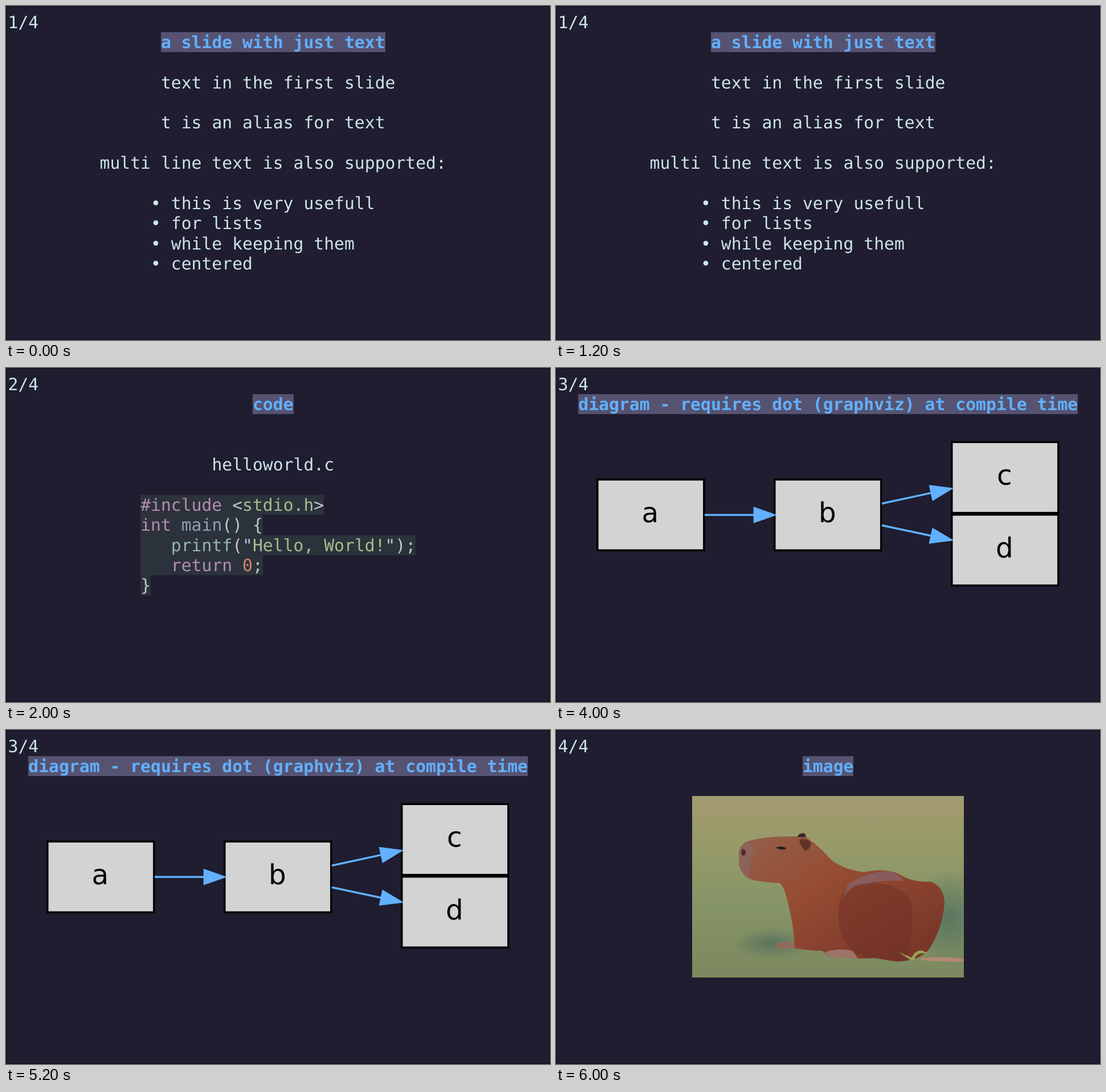
These frames come from a looping animation (955 px wide and 587 px high, 8 s). An HTML page:

```html
<!DOCTYPE html>
<html lang="en">
<head>
<meta charset="utf-8">
<title>Terminal slides</title>
<style>
  html, body { margin: 0; width: 100%; height: 100%; overflow: hidden; background: #1f1d2f; }
  svg { display: block; width: 955px; height: 587px; }
  text { white-space: pre; text-rendering: geometricPrecision; }
  .cell { font: 29.72px "DejaVu Sans Mono", monospace; }
  .bold { font-weight: bold; }
  .node { font: 48.4px "DejaVu Sans", sans-serif; text-anchor: middle; }
</style>
</head>
<body>
<svg id="stage" viewBox="0 0 955 587" xmlns="http://www.w3.org/2000/svg">
  <defs>
    <linearGradient id="grass" x1="0" y1="0" x2="0" y2="1">
      <stop offset="0" stop-color="#a39a70"/>
      <stop offset=".25" stop-color="#989b69"/>
      <stop offset=".6" stop-color="#859466"/>
      <stop offset="1" stop-color="#7c8960"/>
    </linearGradient>
    <linearGradient id="fur" x1="0" y1="0" x2="1" y2="1">
      <stop offset="0" stop-color="#94604a"/>
      <stop offset=".4" stop-color="#964c33"/>
      <stop offset="1" stop-color="#733226"/>
    </linearGradient>
    <radialGradient id="shade">
      <stop offset="0" stop-color="#4c6c5c" stop-opacity=".75"/>
      <stop offset="1" stop-color="#4c6c5c" stop-opacity="0"/>
    </radialGradient>
    <clipPath id="photo"><rect x="239" y="116.5" width="477" height="318.5"/></clipPath>
  </defs>
</svg>
<script>
const NS = "http://www.w3.org/2000/svg";
const stage = document.getElementById("stage");
const LOOP = 8000, COUNT = 4;
const INK = "#cde4ec", BLUE = "#62b0ff", BAND = "#565372", CODE_BG = "#2c323b";
const PURPLE = "#b48ead", GREY = "#c0c5ce", GREEN = "#a3be8c",
      STEEL = "#8fa1b3", TEAL = "#96b5b4", ORANGE = "#d08770";

const colX = c => 3.5 + 17.895 * c;
const rowY = r => 10.7 + 35.35 * r;

function add(parent, tag, attrs, text) {
  const el = document.createElementNS(NS, tag);
  for (const k in attrs) el.setAttribute(k, attrs[k]);
  if (text) el.textContent = text;
  parent.append(el);
  return el;
}

function write(g, row, col, str, fill = INK, cls = "cell") {
  add(g, "text", { x: colX(col), y: rowY(row) + 28, fill, class: cls }, str);
}

function band(g, row, col, len, fill) {
  const x = Math.round(colX(col)), y = Math.round(rowY(row));
  add(g, "rect", {
    x, y, fill,
    width: Math.round(colX(col + len)) - x,
    height: Math.round(rowY(row + 1)) - y
  });
}

function slide(index, col, title) {
  const g = add(stage, "g", { opacity: 0 });
  write(g, 0, 0, `${index + 1}/${COUNT}`);
  band(g, 1, col, title.length, BAND);
  write(g, 1, col, title, BLUE, "cell bold");
  g.animate([
    { opacity: 1, offset: 0, easing: "steps(1, end)" },
    { opacity: 0, offset: 1 / COUNT },
    { opacity: 0, offset: 1 }
  ], {
    duration: LOOP,
    iterations: Infinity,
    iterationStart: (COUNT - index) % COUNT / COUNT
  });
  return g;
}

function textSlide() {
  const g = slide(0, 15, "a slide with just text");
  [
    [3, 15, "text in the first slide"],
    [5, 15, "t is an alias for text"],
    [7, 9, "multi line text is also supported:"],
    [9, 14, "• this is very usefull"],
    [10, 14, "• for lists"],
    [11, 14, "• while keeping them"],
    [12, 14, "• centered"]
  ].forEach(line => write(g, ...line));
}

function codeSlide() {
  const g = slide(1, 24, "code");
  write(g, 4, 20, "helloworld.c");
  [
    [["#include ", PURPLE], ["<", GREY], ["stdio.h", GREEN], [">", GREY]],
    [["int ", PURPLE], ["main", STEEL], ["() {", GREY]],
    [["   ", GREY], ["printf", TEAL], ["(\"", GREY], ["Hello, World!", GREEN], ["\");", GREY]],
    [["   ", GREY], ["return ", PURPLE], ["0", ORANGE], [";", GREY]],
    [["}", GREY]]
  ].forEach((runs, i) => {
    let col = 13;
    band(g, 6 + i, col, runs.map(r => r[0]).join("").length, CODE_BG);
    for (const [str, fill] of runs) {
      if (str.trim()) write(g, 6 + i, col, str, fill);
      col += str.length;
    }
  });
}

function diagramSlide() {
  const g = slide(2, 2, "diagram - requires dot (graphviz) at compile time");
  const w = 187, h = 124.4;
  [["a", 72.8, 196], ["b", 383.8, 196], ["c", 694.8, 130.2], ["d", 694.8, 257.8]]
    .forEach(([name, x, y]) => {
      add(g, "rect", { x, y, width: w, height: h, fill: "#d3d3d3", stroke: "#000", "stroke-width": 3.46 });
      add(g, "text", { x: x + w / 2 - 1, y: y + h / 2 + 12.8, class: "node" }, name);
    });
  // Each arrow: tip, angle in degrees, shaft length
  [[383, 258.3, 0, 122], [693.2, 212.1, -12.2, 124], [693.2, 302.1, 11.9, 124]]
    .forEach(([x, y, angle, len]) => {
      add(g, "path", {
        d: `M${-len} 0H-34.6M0 0L-34.6 -12.1V12.1Z`,
        transform: `translate(${x} ${y}) rotate(${angle})`,
        fill: BLUE, stroke: BLUE, "stroke-width": 3.46, "stroke-miterlimit": 10
      });
    });
}

function imageSlide() {
  const g = slide(3, 24, "image");
  const p = add(g, "g", { "clip-path": "url(#photo)" });
  const shape = (d, fill, opacity = 1) => add(p, "path", { d, fill, opacity });
  const oval = (cx, cy, rx, ry, fill) => add(p, "ellipse", { cx, cy, rx, ry, fill });
  add(p, "rect", { x: 239, y: 116, width: 477, height: 320, fill: "url(#grass)" });
  oval(690, 330, 75, 85, "url(#shade)");
  oval(380, 375, 70, 28, "url(#shade)");
  shape("M640 401Q680 397 716 402V407Q670 408 640 404Z", "#b08a70");
  shape("M384 378Q398 367 420 373L424 384H388Z", "#8f6c5c");
  // Body
  shape("M321 215Q322 203 335 196Q365 186 424 187Q427 180 437 182L441 190" +
    "Q462 204 481 226Q500 244 540 250Q580 241 606 255Q622 267 660 267Q682 278 682 305" +
    "Q678 350 655 385Q640 405 600 407Q575 404 560 400Q530 404 475 398L468 388" +
    "Q440 388 419 383Q417 340 408 308Q403 280 393 269Q365 268 343 263Q324 252 321 236Z", "url(#fur)");
  shape("M498 300Q508 272 530 270Q600 262 622 300Q634 350 612 406Q580 405 545 400Q486 380 498 300Z", "#6b2d24", .45);
  shape("M512 272Q545 249 582 248Q606 254 610 266Q570 262 545 271Q520 270 503 296Z", "#86697a", .6);
  shape("M470 392Q490 382 520 388L530 401Q500 402 474 398Z", "#9a7468");
  // Head
  shape("M321 215Q324 202 338 196Q352 200 346 216Q340 232 338 262Q324 252 321 236Z", "#8a6460", .75);
  oval(329, 215, 4, 6, "#4c302e");
  shape("M386 207Q395 202 405 208Q396 213 386 207Z", "#2c1c1c");
  shape("M424 188Q427 180 437 182L438 188Z", "#30272d");
  shape("M427 193Q440 189 448 199Q447 209 438 213Q429 205 427 193Z", "#633329");
  shape("M601 390L622 404H629Q632 389 652 393Q640 382 629 393L624 400Z", "#94a653");
}

textSlide();
codeSlide();
diagramSlide();
imageSlide();
add(stage, "rect", { x: .5, y: .5, width: 954, height: 586, fill: "none", stroke: "#0d0c14" });
</script>
</body>
</html>
```
